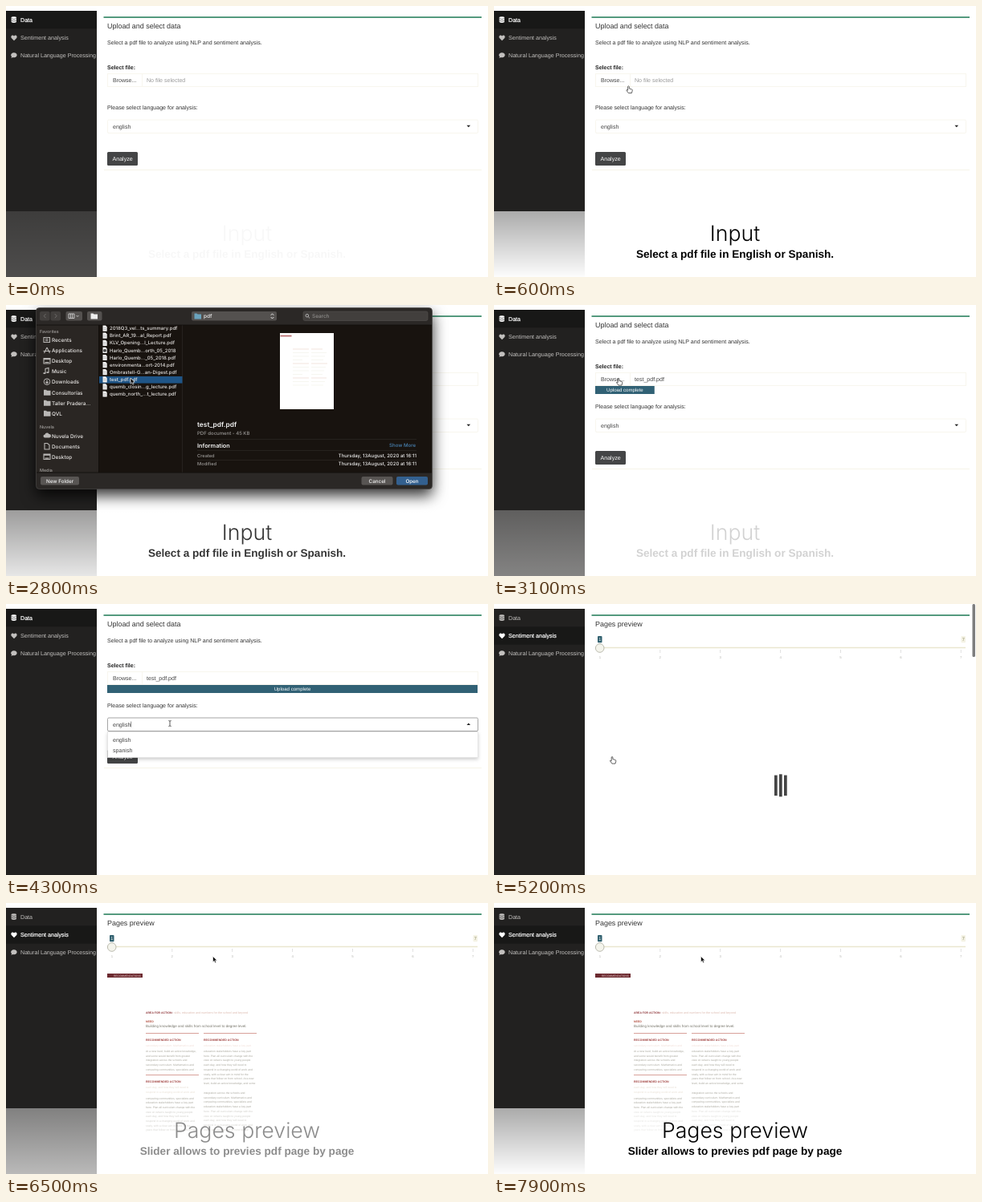
Recreate the animation shown at these times as an HTML page. Size 600 px wide and 338 px high, loop 8000 ms.

```html
<!DOCTYPE html>
<html lang="en">
<head>
<meta charset="utf-8">
<title>Upload and preview</title>
<style>
html, body { margin: 0; width: 100%; height: 100%; overflow: hidden; background: #fff; }
svg { display: block; width: 100vw; height: 100vh; }
text { font-family: "Liberation Sans", Arial, sans-serif; text-rendering: geometricPrecision; white-space: pre; }
.ui text { font-family: Inter, Roboto, sans-serif; font-weight: 500; }
.ui .bold { font-weight: 600; }
.bold { font-weight: 700; }
.thin { font-family: Inter, "Open Sans", sans-serif; font-weight: 300; }
.mid { text-anchor: middle; }
.end { text-anchor: end; }
#dialog { filter: drop-shadow(0 8px 9px rgba(0,0,0,.8)); }
#menu { filter: drop-shadow(0 2px 2px rgba(0,0,0,.2)); }
</style>
</head>
<body>
<svg id="stage" viewBox="0 0 600 338"></svg>
<script>
const rect = (x, y, w, h, fill, more = '') =>
  `<rect x="${x}" y="${y}" width="${w}" height="${h}" fill="${fill}" ${more}/>`;
const text = (x, y, str, size = 7.07, fill = '#333', more = '') =>
  `<text x="${x}" y="${y}" font-size="${size}" fill="${fill}" ${more}>${str}</text>`;
const path = (d, fill, more = '') => `<path d="${d}" fill="${fill}" ${more}/>`;
const line = (d, stroke, width = 1) => path(d, 'none', `stroke="${stroke}" stroke-width="${width}"`);
const group = (id, body, more = '') => `<g id="${id}" ${more}>${body}</g>`;
const each = (list, fn) => list.map(fn).join('');
const BOLD = 'class="bold"', MID = 'class="mid"', END = 'class="end"';

// Left navigation
const navItem = (i, label, icon) => group('nav' + i,
  rect(0, 6 + 22.3 * i, 113, 22.3, '#181817', 'class="on"') +
  icon + text(18, 19.7 + 22.3 * i, label, 7.13));

const sidebar = rect(0, 6, 113, 332, '#222120') +
  navItem(0, 'Data', path('M6.6 14.6a3.2 1.4 0 0 1 6.4 0v5a3.2 1.4 0 0 1 -6.4 0z', 'currentColor') +
    line('M6.6 15.7q3.2 1.6 6.4 0M6.6 18.1q3.2 1.6 6.4 0', '#222', .6)) +
  navItem(1, 'Sentiment analysis', path('M10 43.2l-3.2-3.3c-1.6-2 1.3-4.8 3.2-2.4c1.9-2.4 4.8 .4 3.2 2.4z', 'currentColor')) +
  navItem(2, 'Natural Language Processing', path('M10 58.3c5 0 4.8 6 0 6q-1 0-1.5-.3q-1 .9-2.1 .8q.8-.9 .6-1.7c-2-2-.3-4.8 3-4.8z', 'currentColor'));

// Upload form
const FAINT = '#f8f6ee';
const form =
  text(126, 27.6, 'Upload and select data', 8.95) +
  text(126, 48, 'Select a pdf file to analyze using NLP and sentiment analysis.') +
  text(126, 79, 'Select file:', 7, '#222', BOLD) +
  rect(126.5, 84.5, 461, 16, 'none', `stroke="${FAINT}"`) +
  line('M169.5 85v15', FAINT) +
  text(133, 95, 'Browse...', 7.07, '#444') +
  text(175, 95, '', 7.07, '#999', 'id="file"') +
  rect(126, 101, 0, 10, '#316175', 'id="bar"') +
  text(163, 108.2, 'Upload complete', 6.1, '#fff', 'id="done" class="mid"') +
  text(126, 129, 'Please select language for analysis:') +
  rect(126.5, 142, 461, 16.5, '#fff', 'id="select" rx="1.5"') +
  text(133, 152.5, 'english', 7.07, '#444') +
  path('', '#222', 'id="caret"') +
  rect(126, 182, 38, 17, '#444546', 'rx="1.5"') +
  text(132.5, 193, 'Analyze', 7.07, '#fff') +
  line('M122 204.5h470', '#f6f4e8') +
  group('menu', rect(126.5, 159.5, 461, 32, '#fff', 'stroke="#ddd" stroke-width=".6"') +
    text(133, 172, 'english', 7.07, '#444') + text(133, 185, 'spanish', 7.07, '#444') +
    line('M155.7 146.5v7', '#444', .6));

// Pages tab
const filler = 'At a new level, build an active knowledge, and some would benefit from greater integration across the schools and secondary curriculum. Mathematics and computing communities, specialists and education stakeholders have a key part here. Plan all curriculum change with the view on what is taught to young people each day, and how they will need to respond in a changing world of work and study, with a clear aim in mind for the years that follow on from school. ';
const lines = filler.repeat(2).match(/.{1,42}\s/g);
const para = (x, y, from, count, fill = '#a8a69c') =>
  each(lines.slice(from, from + count), (s, i) => text(x, y + 5.7 * i, s.trim(), 3.4, fill));
const action = (x, y) => line(`M${x} ${y - 9.5}h66`, '#cf8a80', .8) +
  text(x, y, 'RECOMMENDED ACTION', 3.6, '#a0413f', BOLD);

const sheet =
  rect(126, 88, 44, 5, '#6c2a30') +
  text(168, 91.9, 'RECOMMENDATIONS', 3.3, '#e6c9c9', END) +
  text(174, 138, 'AREA FOR ACTION:', 3.5, '#8c3236', BOLD) +
  text(209, 138, 'skills, education and numbers for the school and beyond', 3.7, '#dcb9ae') +
  text(174, 148.5, 'NEED', 3.5, '#b04a3a', BOLD) +
  text(174, 154.7, 'Building knowledge and skills from school level to degree level.', 4.5, '#77756a') +
  action(174, 172) + action(246, 172) + action(174, 224) +
  para(174, 179, 3, 1, '#f0ddd6') + para(246, 179, 5, 1, '#f0ddd6') +
  para(174, 186, 0, 5) + para(246, 186, 5, 8) + para(246, 238, 2, 9) +
  para(174, 231, 8, 2, '#e6ddd2') + para(174, 244.5, 4, 8);

const pages =
  text(126, 27.6, 'Pages preview', 8.95) +
  line('M126 54.5h461', '#e9e6cf', 1.5) +
  each([1, 2, 3, 4, 5, 6, 7], n => {
    const x = 57 + 74.9 * n;
    return line(`M${x} 57v4`, '#ccc', .6) + text(x, 67.5, n, 4.3, '#b5b5b0', MID);
  }) +
  rect(129, 40, 5.5, 8.3, '#31616f', 'rx="1"') + text(131.7, 46.2, '1', 5.5, '#fff', MID) +
  rect(581.5, 40, 5.5, 8.3, '#f4f2e4', 'rx="1"') + text(584.3, 46.2, '7', 5.5, '#8a8860', MID) +
  '<circle cx="131.7" cy="55" r="5.3" fill="#f4f4ec" stroke="#b5b5a8" stroke-width=".9"/>' +
  group('spinner', each([349, 355, 361], x => rect(x, 212, 3.7, 28, '#444'))) +
  group('sheet', sheet) +
  rect(595.5, 0, 3.5, 66, '#7d7d7d', 'id="scroll" rx="1.5"');

// File dialog
const folder = (x, y, fill) => path(`M${x} ${y}h3l1 1h4.5v6h-8.5z`, fill);
const places = [['Recents', 46], ['Applications', 59], ['Desktop', 72], ['Music', 85], ['Downloads', 98],
  ['Consultorías', 111.5], ['Taller Pradera...', 124.5], ['QVL', 137.5],
  ['Nuvela Drive', 165.5], ['Documents', 178.5], ['Desktop', 191.5]];
const GREY = '#b9b7b5';
const outline = d => line(d, GREY, 1.1), solid = d => path(d, GREY);
const placeIcon = (name, y) => {
  const start = `M47 ${y - 5.5}`;
  switch (name) {
    case 'Recents': return outline(`${start}h7.5v6h-7.5zm2 2h3.5m-3.5 2h3.5`);
    case 'Applications': return outline(`M51 ${y - 6}l-3.5 7m3.5-7l3.5 7m-8-2.5h9`);
    case 'Music': return outline(`M49 ${y}v-5.5l4-1v5.5`) + solid(`M46.5 ${y - .8}h2.8v1.8h-2.8zm4 -1h2.8v1.8h-2.8z`);
    case 'Downloads': return `<circle cx="51" cy="${y - 2.3}" r="3.8" fill="none" stroke="${GREY}"/>` +
      outline(`M51 ${y - 4.5}v4m-1.7-1.6l1.7 1.7l1.7-1.7`);
    case 'Desktop': return outline(`${start}h8v6.5h-8z`) + solid(`${start}h8v1.8h-8zm1.5 4.5h5v1.2h-5z`);
    case 'Documents': return outline(`M48 ${y - 6}h3.5l2.5 2v5.5h-6z`);
    case 'Nuvela Drive': return solid(`M48.5 ${y}a2 2 0 0 1 0-4a2.7 2.7 0 0 1 5-.5a2.2 2.2 0 0 1 .5 4.5z`);
    default: return folder(47, y - 5.8, GREY);
  }
};
const files = ['2018Q3_vel...ts_summary.pdf', 'Brint_AR_19...al_Report.pdf', 'KLV_Opening...l_Lecture.pdf',
  'Harlo_Quemb...orth_05_2018', 'Harlo_Quemb..._05_2018.pdf', 'environmenta...ort-2014.pdf',
  'Ombrastell-G...an-Digest.pdf', 'test_pdf.pdf', 'quemb_closin...g_lecture.pdf', 'quemb_north_...t_lecture.pdf'];
const fileRow = (name, i) => {
  const y = 25.5 + 9.1 * i;
  return path(`M120.5 ${y}h3.5l1.7 1.7v5.5h-5.2z`, '#f2f2f2') +
    line(`M121.5 ${y + 3}h3m-3 2h3`, '#999', .6) +
    (i == 3 ? `<circle cx="123" cy="${y + 4}" r="1.9" fill="#444"/>` : '') +
    text(129, y + 5.7, name, 6, '#e8e6e4');
};
const button = (x, w, label, fill, color = '#f4f4f4') =>
  rect(x, 214, w, 10.5, fill, 'rx="2"') + text(x + w / 2, 221.7, label, 6.3, color, MID);
const fact = (y, label) => text(238, y, label, 5.7, '#9b9997') +
  text(511, y, 'Thursday, 13August, 2020 at 16:11', 6, '#eee', END);

const preview =
  rect(116, 89, 103.5, 8.6, '#1f5587') + fileRow(files[7], 7) +
  rect(341, 35, 67, 95, '#fff') +
  rect(341.5, 38, 14, 1.2, '#a8484a') +
  each([...Array(11).keys()], i => line(`M357 ${55 + 4.5 * i}h${i % 4 == 3 ? 12 : 20}m${i % 4 == 3 ? 11 : 3} 0h${14 + i * 5 % 7}`, i % 4 ? '#f3f2ea' : '#ecd9d0', .7)) +
  text(238, 151.5, 'test_pdf.pdf', 8.4, '#f2f2f2', BOLD) +
  text(238, 162, 'PDF document - 45 KB', 6, '#9b9997') +
  line('M238 167.5h273M238 181.5h273M238 193.5h273', '#302c29', .6) +
  text(238, 177.5, 'Information', 7.3, '#f2f2f2', BOLD) +
  text(510, 177.3, 'Show More', 6.1, '#4a86b8', END) +
  fact(190, 'Created') + fact(200, 'Modified') +
  button(486, 39, 'Open', '#33608f', '#fff');

const dialog =
  rect(37.5, 3.5, 493, 226, '#2b2826', 'rx="4" stroke="#4a4745" stroke-width=".7"') +
  rect(38, 25, 492, 184, '#18130f') + rect(38, 25, 77.5, 184, '#2a2623') +
  line('M115.5 25v184', '#0f0c0a', .8) + line('M219.5 25v184', '#2b2724', .8) +
  line('M38 25h492M38 209h492', '#100d0b', .8) +
  rect(42, 8, 12.5, 11.5, '#423f3d', 'rx="2"') + rect(55.5, 8, 12.5, 11.5, '#423f3d', 'rx="2"') +
  line('M49.5 11.2l-2.3 2.5l2.3 2.5M60.8 11.2l2.3 2.5l-2.3 2.5', '#74716f', .9) +
  rect(74.5, 8, 20.5, 11.5, '#54514f', 'rx="2"') +
  line('M78 11h7v5.5h-7zm2.4 0v5.5m2.3-5.5v5.5M87.5 13l1.5 1.5l1.5-1.5', '#ddd', .8) +
  rect(101, 8, 18.5, 11.5, '#54514f', 'rx="2"') + folder(105.5, 10.5, '#eee') +
  rect(231, 8, 106, 11.5, '#54514f', 'rx="2"') + folder(234.5, 10.5, '#6aa3bd') +
  text(246, 16.2, 'pdf', 6.5, '#f0f0f0') +
  line('M329.7 12.8l1.8-2l1.8 2m-3.6 2.2l1.8 2l1.8-2', '#eee', .9) +
  rect(370, 8, 155, 11.5, '#423f3d', 'rx="2" stroke="#54514f" stroke-width=".6"') +
  '<circle cx="374.8" cy="13.2" r="1.8" fill="none" stroke="#ccc" stroke-width=".8"/>' +
  line('M376.2 14.6l1.8 1.8', '#ccc', .8) + text(381, 16, 'Search', 6.4, '#8f8d8b') +
  text(42, 34.5, 'Favorites', 5.4, '#a3a09e') + text(42, 154, 'Nuvela', 5.4, '#a3a09e') +
  text(42, 207.8, 'Media', 5.4, '#a3a09e') +
  each(places, ([name, y]) => placeIcon(name, y) + text(57, y, name, 6.4, '#eceae8')) +
  each(files, fileRow) +
  button(43, 48, 'New Folder', '#585553') + button(442.5, 39, 'Cancel', '#585553') +
  button(486, 39, 'Open', '#383532', '#75726f') +
  group('preview', preview);

const cursors =
  group('arrow', path('M0 0v7.2l1.7-1.5l1.1 2.5l1.3-.6l-1.1-2.4h2.3z', '#111', 'stroke="#fff" stroke-width=".6"')) +
  group('hand', path('M-.8 1q.9-1.3 1.7 0v2.5l3.3 1q.9 .4 .6 1.6l-.8 3h-4l-2.6-3.5q.2-1.2 1.8 .1z', '#fff', 'stroke="#222" stroke-width=".7"')) +
  group('beam', line('M-1.6-3.5q1.6 0 1.6 1v5q0 1-1.6 1m3.2-7q-1.6 0-1.6 1m0 5q0 1 1.6 1', '#333', .8));

const byId = id => document.getElementById(id);
byId('stage').innerHTML =
  '<defs><linearGradient id="veil" x2="0" y2="1"><stop stop-color="#fff" stop-opacity=".62"/>' +
  '<stop offset="1" stop-color="#fff" stop-opacity=".99"/></linearGradient></defs>' +
  rect(0, 0, 600, 338, '#fff') + group('side', sidebar) +
  rect(121.5, 13.3, 470.5, 1.5, '#1f7a55') +
  group('form', form) + group('pages', pages) +
  group('dialog', dialog, 'class="ui"') + group('cursor', cursors) +
  rect(0, 256, 600, 82, 'url(#veil)', 'id="band"') +
  group('caption', text(300, 292.5, '', 26.7, '#000', 'id="head" class="thin mid"') +
    text(300, 313.5, '', 13.6, '#000', 'id="sub" class="bold mid"'));

const clamp = v => Math.max(0, Math.min(1, v));
const ramp = (t, a, b) => clamp((t - a) / (b - a));
const smooth = p => p * p * (3 - 2 * p);
const show = (id, on) => byId(id).style.display = on ? '' : 'none';
const set = (id, attrs) => { for (const k in attrs) byId(id).setAttribute(k, attrs[k]); };
const say = (id, str) => byId(id).textContent = str;

// time, x, y of the pointer tip
const track = [[150, 300, 190], [700, 155, 91], [950, 155, 91], [1350, 142, 89], [1500, 142, 89], [1850, 155, 91],
  [3600, 155, 91], [4000, 204, 149], [4400, 204, 149], [4650, 150, 169], [4750, 150, 169], [5000, 147, 190],
  [5250, 147, 190], [5900, 260.5, 66.5], [6100, 260.5, 66.5], [6500, 257.5, 66.5]];
function pointer(t) {
  const i = track.findIndex(k => k[0] > t);
  if (i < 0) return track[track.length - 1].slice(1);
  const a = track[Math.max(0, i - 1)], b = track[i], p = smooth(ramp(t, a[0], b[0]));
  return [a[1] + (b[1] - a[1]) * p, a[2] + (b[2] - a[2]) * p];
}
function shape(t) {
  if (t > 600 && t < 900 || t >= 3000 && t < 3650 || t > 4550 && t < 5250) return 'hand';
  return t > 3900 && t <= 4550 ? 'beam' : 'arrow';
}

function draw(t) {
  const tab = t < 5200 ? 0 : 1, open = t >= 4000 && t < 4700, loaded = t >= 6500;
  for (let i = 0; i < 3; i++) {
    const on = i == tab, color = on ? '#fff' : '#c2c0be', nav = byId('nav' + i);
    nav.style.color = color;
    nav.querySelector('.on').style.display = on ? '' : 'none';
    const label = nav.querySelector('text');
    label.setAttribute('fill', color);
    label.setAttribute('stroke', on ? '#fff' : 'none');
    label.setAttribute('stroke-width', .2);
  }
  show('form', !tab);
  show('pages', tab);

  const sent = t >= 3000, width = 461 * ramp(t, 3025, 3500);
  say('file', sent ? 'test_pdf.pdf' : 'No file selected');
  set('file', { fill: sent ? '#444' : '#999' });
  set('bar', { width });
  set('done', { x: 126 + width / 2 });
  show('done', width > 48);
  set('select', { stroke: open ? '#a5a5a5' : FAINT });
  set('caret', { d: open ? 'M573.5 151h4.6l-2.3-2.5z' : 'M573.5 148.7h4.6l-2.3 2.5z' });
  show('menu', open);

  show('dialog', t >= 900 && t < 3000);
  byId('dialog').style.opacity = ramp(t, 820, 1000);
  show('preview', t >= 1900);

  show('spinner', !loaded);
  show('scroll', !loaded);
  show('sheet', loaded);
  [...byId('spinner').children].forEach((bar, i) => {
    const phase = (((t - 5640) / 1000 - .16 * i) % 1 + 1) % 1;
    const h = 17 + 11 * smooth(clamp(1 - Math.abs(phase - .4) / .4)) ** .6;
    bar.setAttribute('y', 226.3 - h / 2);
    bar.setAttribute('height', h);
  });

  const [x, y] = pointer(t), now = shape(t);
  show('cursor', t >= 150);
  set('cursor', { transform: `translate(${x} ${y})` });
  for (const id of ['arrow', 'hand', 'beam']) show(id, id == now);

  const fade = t < 2700 ? ramp(t, -133, 533) : t < 5000 ? 1 - ramp(t, 2733, 3400) : ramp(t, 6050, 6700);
  set('band', { opacity: fade });
  set('caption', { opacity: fade ** 2.2 });
  say('head', tab ? 'Pages preview' : 'Input');
  say('sub', tab ? 'Slider allows to previes pdf page by page' : 'Select a pdf file in English or Spanish.');
}

const begin = performance.now();
function tick() {
  draw((performance.now() - begin) % 8000);
  requestAnimationFrame(tick);
}
tick();
</script>
</body>
</html>
```
